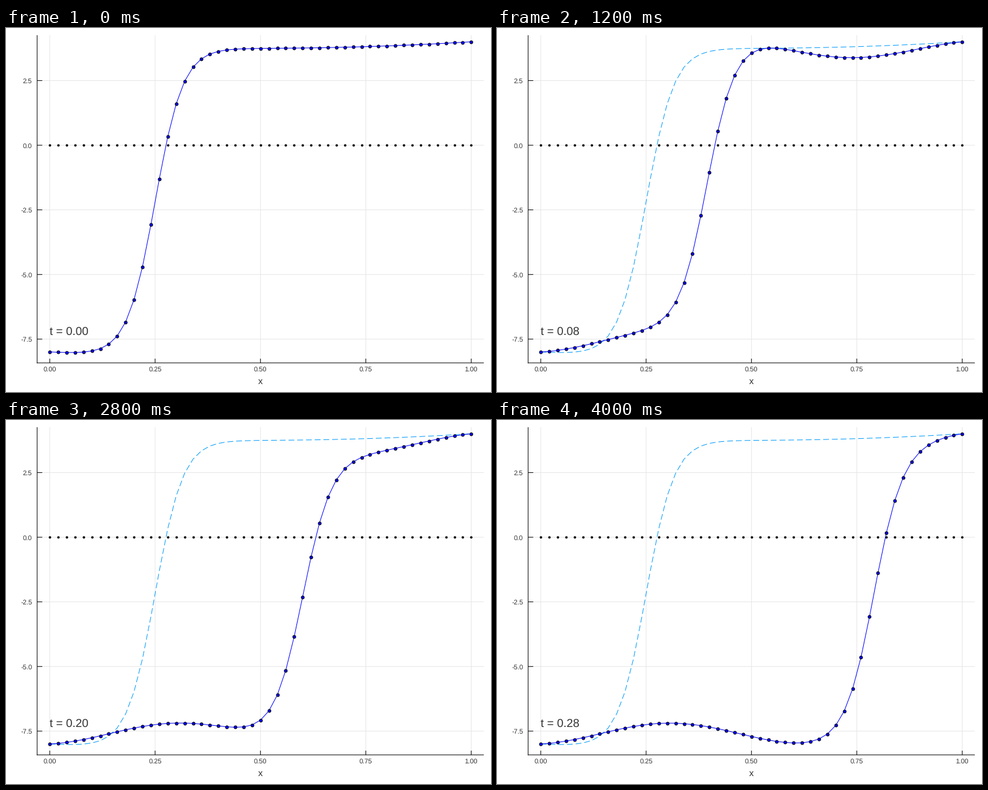
These frames come from a looping animation (800 by 600 pixels, 4.05 s). A matplotlib script:

```python
import numpy as np
import matplotlib.pyplot as plt
from matplotlib.animation import FuncAnimation

# Moving front: u_t = eps u_xx + u u_x - q(x) u,  u(0) = -8, u(1) = 4
EPS, N, T, STEPS, SUB = 0.2, 50, 0.28, 80, 10
INK = "#333333"
PX = 0.72  # points per pixel at 100 dpi
LEFT, RIGHT, TOP, BOTTOM = 51.3, 788.2, 11.8, 552

x = np.linspace(0, 1, N + 1)
h = x[1]
q = 4 * np.sin(3 * np.pi * x)


def rate(u):
    r = np.zeros_like(u)
    mid, lo, hi = u[1:-1], u[:-2], u[2:]
    r[1:-1] = (EPS * (hi - 2 * mid + lo) / h**2
               + mid * (hi - lo) / (2 * h) - q[1:-1] * mid)
    return r


def solve():
    u = x**2 - x - 2 + 6 * np.tanh(3 * (x - 0.25) / EPS)
    states = [u.copy()]
    u[0], u[-1] = -8, 4
    dt = T / STEPS / SUB
    for _ in range(STEPS):
        for _ in range(SUB):
            a = rate(u)
            b = rate(u + dt / 2 * a)
            c = rate(u + dt / 2 * b)
            d = rate(u + dt * c)
            u = u + dt / 6 * (a + 2 * b + 2 * c + d)
        states.append(u)
    return states


def sx(v):
    # the x range is widened by 3 % on both sides
    return LEFT + (RIGHT - LEFT) * (v + 0.03) / 1.06


def sy(v):
    return 193.2 - 42.62 * v


plt.rcParams.update({"font.family": "Liberation Sans",
                     "text.hinting": "none", "text.hinting_factor": 1})
fig = plt.figure(figsize=(8, 6), dpi=100, facecolor="white")
ax = fig.add_axes([0, 0, 1, 1])
ax.set_xlim(0, 800)
ax.set_ylim(600, 0)
ax.axis("off")


def rule(xs, ys, color="black", z=2):
    ax.plot(xs, ys, color=color, lw=PX, zorder=z,
            solid_capstyle="butt", snap=False)


for v in (0, 0.25, 0.5, 0.75, 1):
    p = sx(v)
    rule([p, p], [TOP, BOTTOM], "#e6e6e6", 1)
    rule([p, p], [BOTTOM, BOTTOM - 7])
    ax.text(p, 566, f"{v:.2f}", size=8, color=INK, ha="center")
for v in (2.5, 0, -2.5, -5, -7.5):
    p = sy(v)
    rule([LEFT, RIGHT], [p, p], "#e6e6e6", 1)
    rule([LEFT, LEFT + 8.5], [p, p])
    ax.text(43, p + 4.2, f"{v:.1f}", size=8, color=INK, ha="right")
rule([LEFT, LEFT], [TOP, BOTTOM + 0.5])
rule([LEFT - 0.5, RIGHT], [BOTTOM, BOTTOM])
ax.text(419.5, 587, "x", size=11, color=INK, ha="center")

states = solve()
ax.plot(sx(x), sy(0 * x), "o", color="black", ms=4 * PX, mew=0,
        zorder=3, snap=False)
start, = ax.plot(sx(x), sy(states[0]), color="#009afa", lw=PX,
                 dashes=(9.6, 4.8), dash_capstyle="butt", zorder=4,
                 snap=False)
front, = ax.plot([], [], "-o", color="blue", lw=PX, ms=5 * PX,
                 mec="black", mew=PX, zorder=5, snap=False)
clock = ax.text(71.5, 506, "", size=14, color=INK)


def update(i):
    front.set_data(sx(x), sy(states[i]))
    start.set_visible(i > 0)
    clock.set_text(f"t = {i * T / STEPS:.2f}")
    return start, front, clock


anim = FuncAnimation(fig, update, frames=STEPS + 1, interval=50,
                     repeat=True, repeat_delay=0)
plt.show()
```
